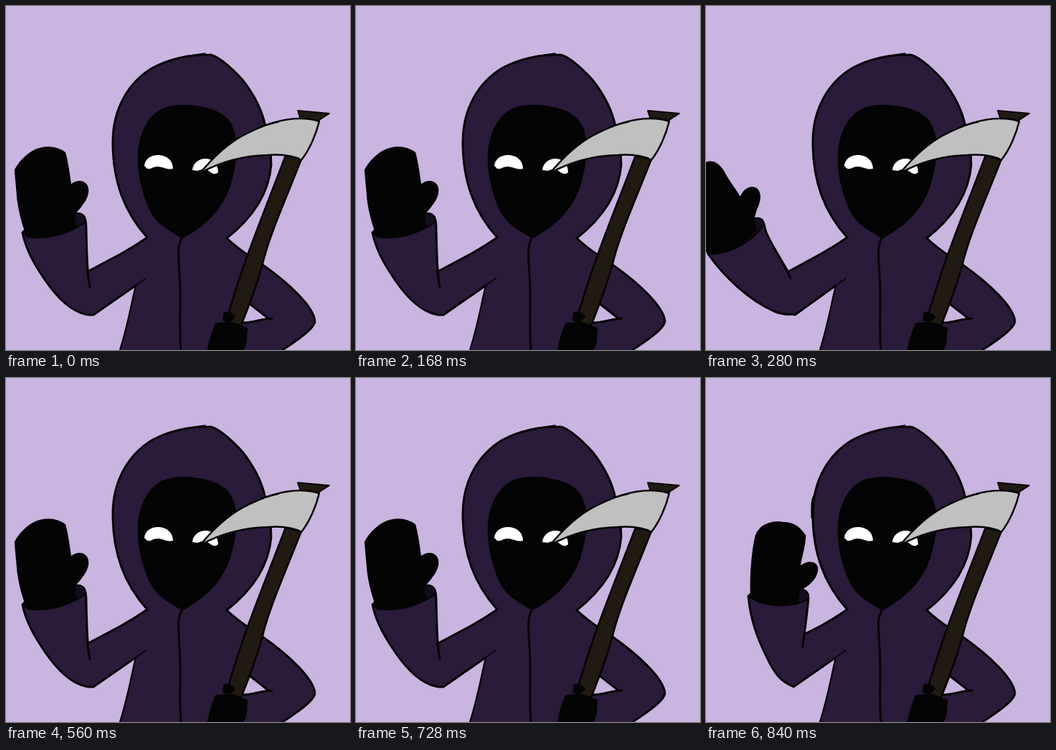
An HTML page that plays this animation: 480 px wide and 480 px high, repeating every 1.12 s.

```html
<!DOCTYPE html>
<html lang="en">
<head>
<meta charset="utf-8">
<title>Waving reaper</title>
<style>
  html, body { margin: 0; width: 100%; height: 100%; overflow: hidden; background: #cab4e0; }
  svg { display: block; width: 100vw; height: 100vh; }
  path { stroke-linecap: round; stroke-linejoin: round; }
  .robe { fill: #291b39; }
  .line { fill: none; stroke: #050407; stroke-width: 3; }
  .thin { stroke-width: 1.6; }
  .ink { fill: #040404; stroke: #040404; stroke-width: 2.6; }
  .wood { fill: #201a12; stroke: #050407; stroke-width: 2.6; }
  .steel { fill: #c0c0c0; stroke: #050407; stroke-width: 2.5; }
</style>
</head>
<body>
<svg viewBox="0 0 480 480">
  <!-- waving arm -->
  <path id="sleeve" class="robe"/>
  <path id="cuff" fill="#150d1f" stroke="#050407" stroke-width="2"/>
  <path id="hand" class="ink"/>
  <path id="edges" class="line"/>

  <!-- body and hood -->
  <path class="robe" d="M197 323L308 324Q322 337 340 349L358 361C395 387 430 420 431 440C430 451 402 469 386 480H159C170 445 174 420 181 390L195 380Z"/>
  <path class="line" d="M308 324Q322 337 340 349L358 361C395 387 430 420 431 440C430 451 402 469 386 480"/>
  <path class="line" style="stroke-width:2.2" d="M181 390C174 420 170 445 159 480"/>
  <path class="line thin" d="M195 380L181 390"/>
  <path class="robe" d="M197 323C165 287 149 245 149 190C149 143 171 106 205 86C230 73 255 68 283 68C292 67 312 83 330 103C348 126 358 148 362 168C368 190 370 207 370 222C367 260 345 295 308 324L246 340Z"/>
  <path class="line" d="M197 323C165 287 149 245 149 190C149 143 171 106 205 86C230 73 255 68 283 68C292 67 312 83 330 103C348 126 358 148 362 168C368 190 370 207 370 222C367 260 345 295 308 324"/>
  <path class="line thin" d="M250 70L278 66"/>
  <path id="crease" class="line" d="M152 163C147 170 148 180 148 195"/>
  <path class="line" d="M246 323C238 335 241 350 242 375C245 410 241 440 244 480"/>

  <!-- face -->
  <path class="ink" d="M246 323C216 306 204 298 195 268C185 240 181 205 190 180C200 150 220 139 245 139C275 139 300 147 310 160C323 178 323 205 316 235C308 275 285 302 246 323Z"/>
  <path fill="#fff" d="M193 223C194 212 204 207 214 208C226 209 233 217 233 227C224 229 222 225 212 224C205 224 203 228 197 227ZM260 229C261 217 272 212 280 213C290 214 296 222 296 232C292 236 288 234 284 231C278 226 272 228 268 230Z"/>

  <!-- scythe -->
  <path fill="#cab4e0" d="M338 414L365 435L330 442Z"/>
  <path class="line" d="M338 414L365 435M371 436C358 436 346 442 330 442"/>
  <path class="wood" d="M390 209C373 254 353 304 338 345C325 380 317 408 307 440L328 446C340 415 352 385 360 352C370 315 386 280 412 214Z"/>
  <path class="wood" d="M407 146L451 150L434 161L411 158Z" style="stroke-width:1.8"/>
  <path class="steel" d="M271 233C290 210 310 192 330 181C360 165 385 157 410 157C425 157 432 159 437 161C433 178 424 200 412 215C400 208 380 207 365 208C330 209 300 217 271 233Z"/>
  <path class="line thin" d="M355 168L380 162"/>
  <path class="ink" style="stroke-width:1" d="M304 428C310 425 318 430 320 434L314 440L303 439Z"/>
  <path class="ink" d="M293 444C305 440 325 446 336 450L335 458C336 470 332 477 330 480H282C284 470 288 455 293 444Z"/>
</svg>
<script>
  const STEP = 280;
  const part = id => document.getElementById(id);

  // outer: cuff to elbow; inner: cuff to the crook; joint: where the upper arm meets the sleeve
  const upright = {
    outer: "M23 316C27 337 36 354 47 371C62 395 82 420 104 428Q112 431 118 431",
    elbow: "122 431",
    joint: "113 371",
    inner: "M112 315C113 350 113 375 117 392",
    fill: "L112 315C112 300 112 290 103 289L28 311Z",
    cuff: "M23 316L28 310L96 290C104 287 111 292 111 299Q109 304 104 306C80 320 55 326 30 322Z",
    rim: "M111 299Q112 305 112 315",
    hand: "M13 229C20 215 35 202 48 199C65 195 75 200 82 205C86 220 88 235 90 251C97 244 107 243 112 250C117 258 112 270 105 278C102 283 97 287 95 291Q94 300 98 309C75 321 50 324 30 322C22 300 17 280 16 262Z"
  };
  const outward = {
    outer: "M0 338L3 346C25 378 60 410 95 426C105 430 115 431 124 430",
    elbow: "124 431",
    joint: "116 370",
    inner: "M84 316C95 340 110 362 118 380",
    fill: "L84 316C82 305 80 296 72 296L0 336Z",
    cuff: "M0 340L4 334L66 297C74 294 80 297 81 304C65 330 35 345 7 346Z",
    rim: "M81 304Q82 310 84 316",
    hand: "M0 219C12 215 20 222 28 238C35 250 42 258 48 269C52 256 62 251 70 255C78 262 74 275 70 283L66 297Q66 304 70 312C50 335 30 345 8 346L-4 333V219Z"
  };
  const inward = {
    outer: "M59 304C62 335 70 360 85 390C95 412 105 424 121 430",
    elbow: "122 431",
    joint: "138 357",
    inner: "M143 307C141 330 138 350 135 375",
    fill: "L143 307Q143 297 130 294L60 302Z",
    cuff: "M59 304L64 299L130 294C140 295 144 300 143 307C130 321 80 321 59 304Z",
    rim: "",
    hand: "M63 300C62 270 66 235 70 220C76 203 95 200 107 202C118 202 128 205 138 220C138 235 132 250 130 265C140 255 152 256 155 264C156 275 148 286 133 294C128 300 127 308 129 313C110 320 80 318 62 306Z"
  };
  const poses = [upright, outward, upright, inward];

  function draw(time) {
    const pose = poses[Math.floor(time / STEP) % poses.length];
    const set = (id, d) => part(id).setAttribute("d", d);
    set("sleeve", `${pose.outer}L${pose.elbow}L181 390L215 380V323H197L160 346L${pose.joint}${pose.fill}`);
    set("cuff", pose.cuff);
    set("hand", pose.hand);
    set("edges", `${pose.outer}L${pose.elbow}L181 390${pose.inner}${pose.rim}M${pose.joint}L160 346Q180 335 197 323`);
    part("crease").style.display = pose === inward ? "" : "none";
  }

  const start = performance.now();
  function tick() {
    draw(performance.now() - start);
    requestAnimationFrame(tick);
  }
  tick();
</script>
</body>
</html>
```
